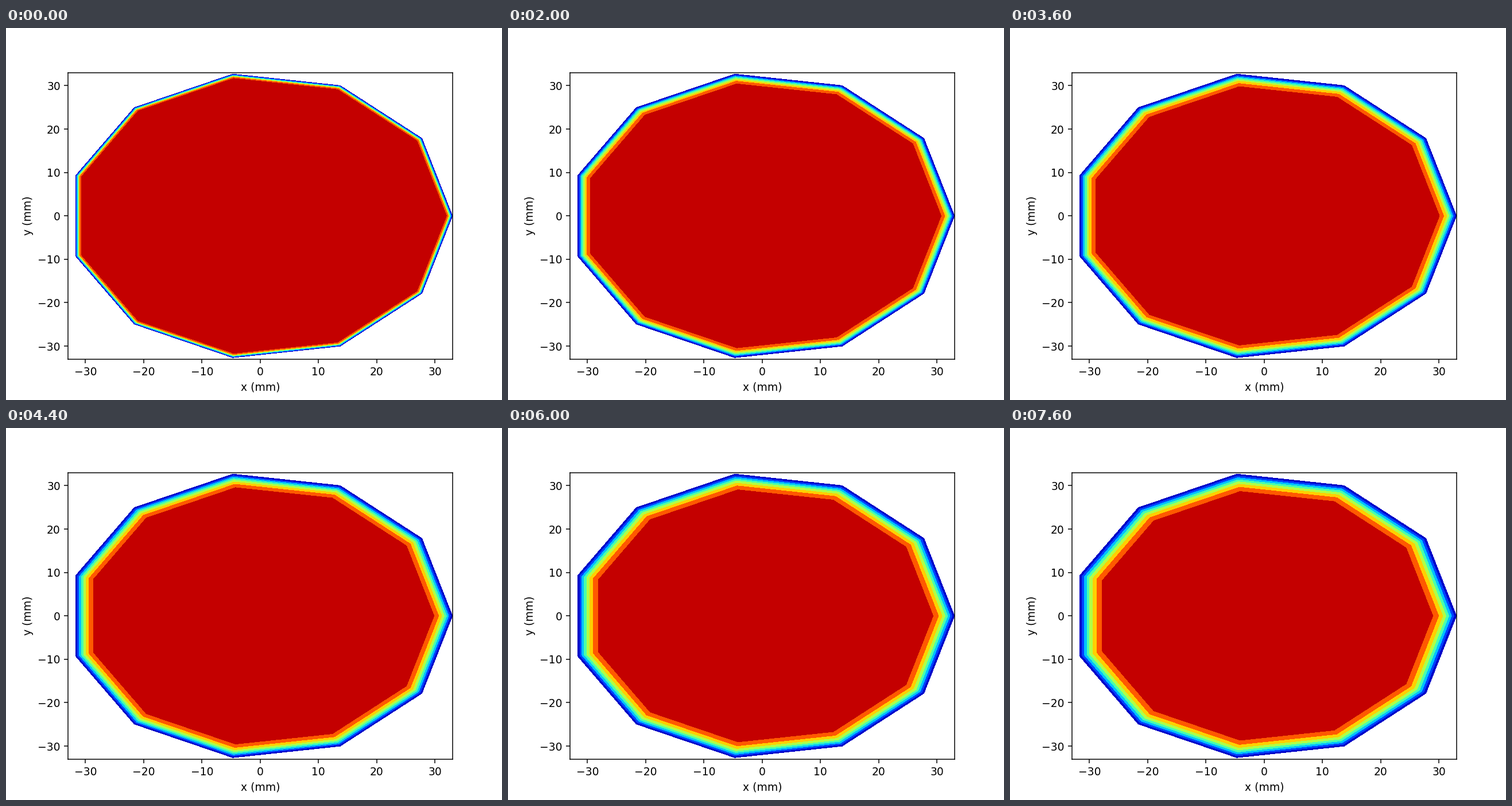
These frames come from a looping animation (864 by 648 pixels, 8000 ms). A matplotlib script:

```python
import math

import matplotlib.pyplot as plt
import numpy as np
from matplotlib.animation import FuncAnimation

RADIUS = 33.0      # mm
FRAMES = 20
INTERVAL = 400     # ms
SPREAD = 0.689     # growth of the squared diffusion length per step, mm^2

radii = np.linspace(0, RADIUS, 41)
angles = np.linspace(0, 2 * np.pi, 12)
r_grid, a_grid = np.meshgrid(radii, angles)
x_grid = r_grid * np.cos(a_grid)
y_grid = r_grid * np.sin(a_grid)
levels = np.linspace(0, 1, 9)

plt.rcParams["font.family"] = "DejaVu Sans"
fig, ax = plt.subplots(figsize=(6.4, 4.8), dpi=135)
ax.set(xlim=(-RADIUS, RADIUS), ylim=(-RADIUS, RADIUS),
       xlabel="x (mm)", ylabel="y (mm)")


def temperature(step):
    """Normalised radial profile of a body cooled at its rim."""
    length = math.sqrt(SPREAD * step)
    return np.array([math.erf((RADIUS - r) / length) for r in radii])


def draw(frame):
    for artist in list(ax.collections):
        artist.remove()
    field = np.tile(temperature(frame + 1), (len(angles), 1))
    return [ax.contourf(x_grid, y_grid, field, levels=levels, cmap="jet")]


anim = FuncAnimation(fig, draw, frames=FRAMES, init_func=lambda: draw(0),
                     interval=INTERVAL, repeat=True, repeat_delay=0, blit=False)
plt.show()
```
